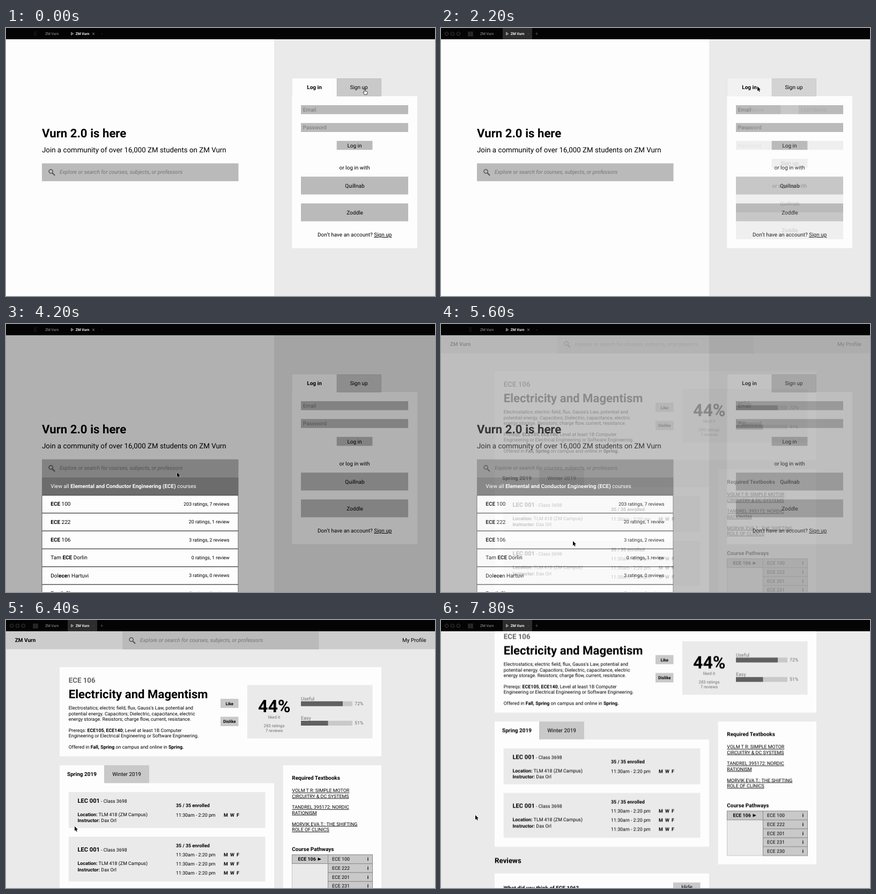
These frames come from a looping animation (800 px wide and 500 px high, 8000 ms). An HTML page:

```html
<!DOCTYPE html>
<html lang="en">
<head>
<meta charset="utf-8">
<title>Course site prototype</title>
<style>
html, body { margin: 0; width: 100%; height: 100%; overflow: hidden; background: #eaeaea; }
svg { display: block; width: 800px; height: 500px; font: 10px Roboto, sans-serif; text-rendering: geometricPrecision; }

/* type */
.b { font-weight: 700; }
.h1 { font-size: 22.2px; font-weight: 700; }
.h2 { font-size: 13.33px; }
.s { font-size: 8.89px; }
.xs { font-size: 7.8px; }
.tab { font-size: 6.7px; }
.c { text-anchor: middle; }
.r { text-anchor: end; }
.u { text-decoration: underline; }
.hint { fill: #757575; }
.i { font-style: italic; }
.days { font-weight: 700; word-spacing: 2px; }

/* surfaces */
.white { fill: #fdfdfd; }
.pale { fill: #eaeaea; }
.mid { fill: #c9c9c9; }
.field { fill: #bababa; }
.dark { fill: #606060; }
.edge { stroke: #b6b6b6; stroke-width: .8; }

/* the picture advances in 200 ms steps (2.5% each) */
.anim { animation: 8s step-end infinite; }
#login { animation-name: login; }
#shade { animation-name: shade; opacity: 0; }
#results { animation-name: results; opacity: 0; }
#course { animation-name: course; opacity: 0; }
#scroll { animation-name: scroll; }
#chromeFull { animation-name: chromeFull; opacity: 0; }
#chromeDim { animation-name: chromeDim; }
#cursor { animation-name: move; }
#arrow { animation-name: arrow; }
#hand { animation-name: hand; }

@keyframes login {
  0% { opacity: 1 } 7.5% { opacity: .65 } 10% { opacity: .1 } 12.5% { opacity: 0 }
  25% { opacity: .2 } 27.5% { opacity: .8 } 30% { opacity: 1 }
}
@keyframes shade { 0% { opacity: 0 } 47.5% { opacity: .04 } 50% { opacity: .26 } 52.5% { opacity: .3 } }
@keyframes results { 0% { opacity: 0 } 47.5% { opacity: .35 } 50% { opacity: .9 } 52.5% { opacity: 1 } }
@keyframes course { 0% { opacity: 0 } 70% { opacity: .22 } 72.5% { opacity: .85 } 75% { opacity: 1 } }
@keyframes scroll {
  0% { transform: none }
  85% { transform: translateY(-5px) } 87.5% { transform: translateY(-20px) }
  90% { transform: translateY(-40px) } 92.5% { transform: translateY(-58px) }
  95% { transform: translateY(-72px) } 97.5% { transform: translateY(-81.6px) }
}
@keyframes chromeFull { 0% { opacity: 0 } 15% { opacity: 1 } 35% { opacity: 0 } 77.5% { opacity: 1 } }
@keyframes chromeDim { 0% { opacity: 1 } 15% { opacity: 0 } 35% { opacity: 1 } 77.5% { opacity: 0 } }
@keyframes arrow { 0% { opacity: 0 } 10% { opacity: 1 } 20% { opacity: 0 } 25% { opacity: 1 } }
@keyframes hand { 0% { opacity: 1 } 10% { opacity: 0 } 20% { opacity: 1 } 25% { opacity: 0 } }
@keyframes move {
  0% { transform: translate(669px, 114px) }
  15% { transform: translate(658px, 113px) }
  17.5% { transform: translate(612px, 110px) }
  20% { transform: translate(590px, 109px) }
  30% { transform: translate(583px, 113px) }
  32.5% { transform: translate(530px, 150px) }
  35% { transform: translate(462px, 198px) }
  37.5% { transform: translate(419px, 227px) }
  40% { transform: translate(345px, 264px) }
  42.5% { transform: translate(319px, 277px) }
  55% { transform: translate(316px, 290px) }
  57.5% { transform: translate(304px, 322px) }
  60% { transform: translate(280px, 362px) }
  62.5% { transform: translate(256px, 394px) }
  65% { transform: translate(246px, 405px) }
  75% { transform: translate(230px, 402px) }
  77.5% { transform: translate(182px, 393px) }
  80% { transform: translate(128px, 385px) }
  82.5% { transform: translate(82px, 370px) }
  85% { transform: translate(64px, 364px) }
}
</style>
</head>
<body>
<svg viewBox="0 0 800 500">
  <defs>
    <g id="search">
      <rect class="field" x="67" y="252.5" width="366.5" height="33.3"/>
      <g fill="none" stroke="#505050">
        <circle cx="83.7" cy="267.5" r="3.6" stroke-width="1.5"/>
        <path d="M86.5 270.5 91 275" stroke-width="1.9"/>
      </g>
      <text class="hint i" x="100" y="272.3">Explore or search for courses, subjects, or professors</text>
    </g>
    <g id="lecture">
      <text x="133.5" y="341"><tspan class="b" font-size="11.1">LEC 001</tspan><tspan class="s"> - Class 3698</tspan></text>
    </g>
    <g id="place" class="s">
      <text x="133.5" y="365.5"><tspan class="b">Location:</tspan> TLM 418 (ZM Campus)</text>
      <text x="133.5" y="377"><tspan class="b">Instructor:</tspan> Dax Orl</text>
    </g>
    <text id="enrolled" class="s b" x="317" y="349">35 / 35 enrolled</text>
    <g id="slot" class="s">
      <text x="317" y="366.5">11:30am - 2:20 pm</text>
      <text class="days" x="406" y="366.5">M W F</text>
    </g>
    <rect id="cell" class="mid" x="600.5" y="438" width="83" height="16.7" stroke="#8a8a8a"/>
  </defs>

  <!-- landing page -->
  <rect class="white" width="800" height="500"/>
  <rect class="pale" x="500" width="300" height="500"/>
  <text class="h1" x="67" y="203.5">Vurn 2.0 is here</text>
  <text class="h2" x="67" y="232.3">Join a community of over 16,000 ZM students on ZM Vurn</text>
  <use href="#search"/>

  <g id="signup">
    <rect class="white" x="533.5" y="127" width="233.3" height="283.5"/>
    <rect class="mid edge" x="534" y="94.5" width="82.5" height="32.5"/>
    <rect class="white" x="616.7" y="94" width="83.3" height="34"/>
    <text class="b c" x="575" y="114">Log in</text>
    <text class="c" x="658" y="114">Sign up</text>
    <g class="field">
      <rect x="550" y="144" width="83.3" height="16.7"/>
      <rect x="666.7" y="144" width="83.3" height="16.7"/>
      <rect x="550" y="177.3" width="200" height="16.7"/>
      <rect x="550" y="210.6" width="200" height="16.7"/>
      <rect x="616.7" y="244" width="66.7" height="16.7"/>
      <rect x="550" y="310.7" width="200" height="33.3"/>
      <rect x="550" y="360.7" width="200" height="33.3"/>
    </g>
    <g class="hint">
      <text x="553.7" y="156">First Name</text>
      <text x="670.5" y="156">Last Name</text>
      <text x="553.7" y="189">Email</text>
      <text x="553.7" y="222.5">Password</text>
    </g>
    <g class="c">
      <text x="650" y="256">Sign up</text>
      <text x="650" y="297.5">or sign up with</text>
      <text x="650.5" y="331">Quillnab</text>
      <text x="650.5" y="381">Zoddle</text>
    </g>
  </g>

  <g id="login" class="anim">
    <rect class="white" x="533.5" y="127" width="233.3" height="283.5"/>
    <rect class="mid edge" x="617" y="94.5" width="82.5" height="32.5"/>
    <rect class="white" x="533.5" y="94" width="83.2" height="34"/>
    <text class="b c" x="575" y="114">Log in</text>
    <text class="c" x="658" y="114">Sign up</text>
    <g class="field">
      <rect x="550" y="144" width="200" height="16.7"/>
      <rect x="550" y="177.3" width="200" height="16.7"/>
      <rect x="616.7" y="210.6" width="66.7" height="16.7"/>
      <rect x="550" y="277.3" width="200" height="33.3"/>
      <rect x="550" y="327.3" width="200" height="33.3"/>
    </g>
    <g class="hint">
      <text x="553.7" y="156">Email</text>
      <text x="553.7" y="189">Password</text>
    </g>
    <g class="c">
      <text x="650" y="222.5">Log in</text>
      <text x="650" y="264">or log in with</text>
      <text x="650.5" y="297.5">Quillnab</text>
      <text x="650.5" y="347.5">Zoddle</text>
      <text x="650.2" y="389">Don’t have an account? <tspan class="u">Sign up</tspan></text>
    </g>
  </g>

  <rect id="shade" class="anim" width="800" height="500"/>

  <g id="results" class="anim">
    <rect x="67" y="286" width="366.5" height="33.5" fill="#6c6c6c"/>
    <text x="83.3" y="305.7" fill="#fff">View all <tspan class="b">Elemental and Conductor Engineering (ECE)</tspan> courses</text>
    <rect class="white" x="67" y="319.5" width="366.5" height="190"/>
    <g fill="none" stroke="#555">
      <path d="M67 510V319.5M433 510V319.5"/>
      <path d="M67 319.5H433M67 352.7H433M67 386H433M67 419.5H433M67 452.8H433M67 486H433" stroke-width="1.5"/>
    </g>
    <text x="83.3" y="339"><tspan class="b">ECE</tspan> 100</text>
    <text x="83.3" y="372.5"><tspan class="b">ECE</tspan> 222</text>
    <text x="83.3" y="405.8"><tspan class="b">ECE</tspan> 106</text>
    <text x="83.3" y="439">Tam <tspan class="b">ECE</tspan> Dorlin</text>
    <text x="83.3" y="472.5">Dol<tspan class="b">ece</tspan>n Hartuvi</text>
    <text x="83.3" y="505.8">Perrik Slom</text>
    <g class="s r">
      <text x="416.7" y="338.7">203 ratings, 7 reviews</text>
      <text x="416.7" y="372.2">20 ratings, 1 review</text>
      <text x="416.7" y="405.5">3 ratings, 2 reviews</text>
      <text x="416.7" y="438.8">0 ratings, 1 review</text>
      <text x="416.7" y="472.2">3 ratings, 0 reviews</text>
      <text x="416.7" y="505.5">5 ratings, 0 reviews</text>
    </g>
  </g>

  <!-- course page -->
  <g id="course" class="anim">
    <rect class="pale" width="800" height="500"/>
    <g id="scroll" class="anim">
      <rect x="0" y="21" width="800" height="33.5" fill="#ccc"/>
      <use href="#search" x="150" y="-231"/>
      <text class="b" x="16.7" y="41.3">ZM Vurn</text>
      <text class="r" x="783.5" y="41.3">My Profile</text>

      <rect class="white" x="100" y="88" width="600" height="166.3"/>
      <text class="h2 b" x="116.7" y="116.7" fill="#666">ECE 106</text>
      <text class="h1" x="116.7" y="145.5">Electricity and Magentism</text>
      <g class="s">
        <text x="116.7" y="167.3">Electrostatics; electric field, flux, Gauss's Law, potential and</text>
        <text x="116.7" y="177.7">potential energy. Capacitors; Dielectric, capacitance, electric</text>
        <text x="116.7" y="188">energy storage. Resistors; charge flow, current, resistance.</text>
        <text x="116.7" y="209">Prereqs: <tspan class="b">ECE105</tspan>, <tspan class="b">ECE140</tspan>; Level at least 1B Computer</text>
        <text x="116.7" y="219.4">Engineering or Electrical Engineering or Software Engineering.</text>
        <text x="116.7" y="240.3">Offered in <tspan class="b">Fall, Spring</tspan> on campus and online in <tspan class="b">Spring.</tspan></text>
      </g>
      <rect class="mid" x="400" y="147" width="33.5" height="17"/>
      <rect class="mid" x="400" y="180.5" width="33.5" height="17.5"/>
      <text class="xs b c" x="416.7" y="158.6">Like</text>
      <text class="xs b c" x="416.7" y="192.2">Dislike</text>

      <rect class="pale" x="450" y="121.3" width="233.5" height="99.7"/>
      <text class="b c" x="500.3" y="171.5" font-size="32.2">44%</text>
      <g class="xs c" fill="#707070">
        <text x="500" y="183.7">liked it</text>
        <text x="500" y="200">283 ratings</text>
        <text x="500" y="208.5">7 reviews</text>
      </g>
      <g class="s" fill="#707070">
        <text x="550" y="149.7">Useful</text>
        <text x="650" y="159.3">72%</text>
        <text x="550" y="185.7">Easy</text>
        <text x="650" y="195.3">51%</text>
      </g>
      <rect class="mid" x="550" y="151.7" width="96" height="9"/>
      <rect class="dark" x="550" y="151.7" width="78" height="9"/>
      <rect class="mid" x="550" y="188" width="96" height="9"/>
      <rect class="dark" x="550" y="188" width="50.5" height="9"/>

      <rect class="mid" x="183" y="271" width="84" height="33.5"/>
      <path class="white" d="M100 271H183V304.5H500V504.5H100Z"/>
      <text class="b c" x="141.5" y="291.3">Spring 2019</text>
      <text class="c" x="225" y="291.3">Winter 2019</text>

      <rect class="pale" x="116.7" y="321" width="366.8" height="67"/>
      <use href="#lecture"/>
      <use href="#place"/>
      <use href="#enrolled"/>
      <use href="#slot"/>

      <rect class="pale" x="116.7" y="404.3" width="366.8" height="83.5"/>
      <use href="#lecture" y="91"/>
      <use href="#place" y="91.5"/>
      <use href="#enrolled" y="74.5"/>
      <use href="#slot" y="74.3"/>
      <use href="#slot" y="91.5"/>
      <use href="#slot" y="108.8"/>

      <rect class="white" x="516.7" y="271" width="183.3" height="266.5"/>
      <text class="b" x="533.3" y="297.5">Required Textbooks</text>
      <g class="s u">
        <text x="533.3" y="321.2">VOLM T R: SIMPLE MOTOR</text>
        <text x="533.3" y="331.6">CIRCUITRY &amp; DC SYSTEMS</text>
        <text x="533.3" y="352.2">TANDREL 395172: NORDIC</text>
        <text x="533.3" y="362.6">RATIONISM</text>
        <text x="533.3" y="383.5">MORVIK EVA T.: THE SHIFTING</text>
        <text x="533.3" y="394">ROLE OF CLINICS</text>
      </g>
      <text class="b" x="533.3" y="431">Course Pathways</text>
      <rect class="pale" x="533.5" y="438" width="150" height="83" stroke="#c4c4c4"/>
      <rect class="mid" x="533.5" y="438" width="67" height="16.5" stroke="#8a8a8a"/>
      <text class="s b" x="544.5" y="449.3">ECE 106</text>
      <path d="M581.5 443.3 588 446.2 581.5 449.1Z"/>
      <use href="#cell"/>
      <use href="#cell" y="16.6"/>
      <use href="#cell" y="33.2"/>
      <use href="#cell" y="49.8"/>
      <use href="#cell" y="66.4"/>
      <g class="s">
        <text x="608" y="449.3">ECE 100</text>
        <text x="608" y="465.8">ECE 222</text>
        <text x="608" y="482.8">ECE 201</text>
        <text x="608" y="499.3">ECE 231</text>
        <text x="608" y="515.8">ECE 230</text>
      </g>
      <g class="s b c">
        <text x="675" y="449.3">i</text>
        <text x="675" y="465.8">i</text>
        <text x="675" y="482.8">i</text>
        <text x="675" y="499.3">i</text>
        <text x="675" y="515.8">i</text>
      </g>

      <text class="h2 b" x="100" y="534.7">Reviews</text>
      <rect class="white" x="100" y="554.5" width="400" height="60"/>
      <text class="b" x="116.7" y="584.8">What did you think of ECE 106?</text>
      <rect class="mid" x="433" y="571.3" width="50.5" height="17"/>
      <text class="c" x="458.5" y="583">Hide</text>
    </g>
  </g>

  <!-- window bar -->
  <rect width="800" height="21" fill="#040404"/>
  <g id="chromeFull" class="anim">
    <rect x="115" width="55" height="21" fill="#2d2d2d"/>
    <g fill="none" stroke="#444">
      <circle cx="10.5" cy="10.7" r="3.2"/>
      <circle cx="21.5" cy="10.7" r="3.2"/>
      <circle cx="32.5" cy="10.7" r="3.2"/>
      <path d="M51 7.5h3v3h-3zM56 7.5h3v3h-3zM51 12h3v3h-3zM56 12h3v3h-3z" stroke="#5a5a5a" stroke-width=".8"/>
      <path d="M176 10.7h5M178.5 8.2v5M161.5 10.7h3" stroke="#555" stroke-width=".8"/>
    </g>
  </g>
  <g id="chromeDim" class="anim" fill="none" stroke="#777">
    <path d="M52.5 7.5h6M52.5 10.5h6M52.5 13.5h6" stroke-width=".8" stroke-dasharray="1 2"/>
    <path d="M161 8.7l4 4M165 8.7l-4 4" stroke="#aaa" stroke-width=".8"/>
    <path d="M178 10.7h1"/>
  </g>
  <text class="tab" x="73" y="13" fill="#a5a5a5">ZM Vurn</text>
  <text class="tab b" x="129.7" y="13" fill="#f4f4f4">ZM Vurn</text>
  <path d="M121.7 8.4 125.5 10.7 121.7 13Z" fill="none" stroke="#eee" stroke-width=".9"/>

  <g id="cursor" class="anim">
    <path id="arrow" class="anim" d="M0 0V8.4L1.9 6.7 3.2 9.7 4.7 9.1 3.4 6.1H6Z" stroke="#fff" stroke-width=".8" paint-order="stroke"/>
    <path id="hand" class="anim" d="M-1 .5Q0-.7 1 .5V4L4.3 4.6Q5.3 5 5 6.5L4.2 10H-.6L-3 6.4Q-3 5.2-1 6.2Z" fill="#fff" stroke="#111" stroke-width=".8"/>
  </g>
</svg>
</body>
</html>
```
